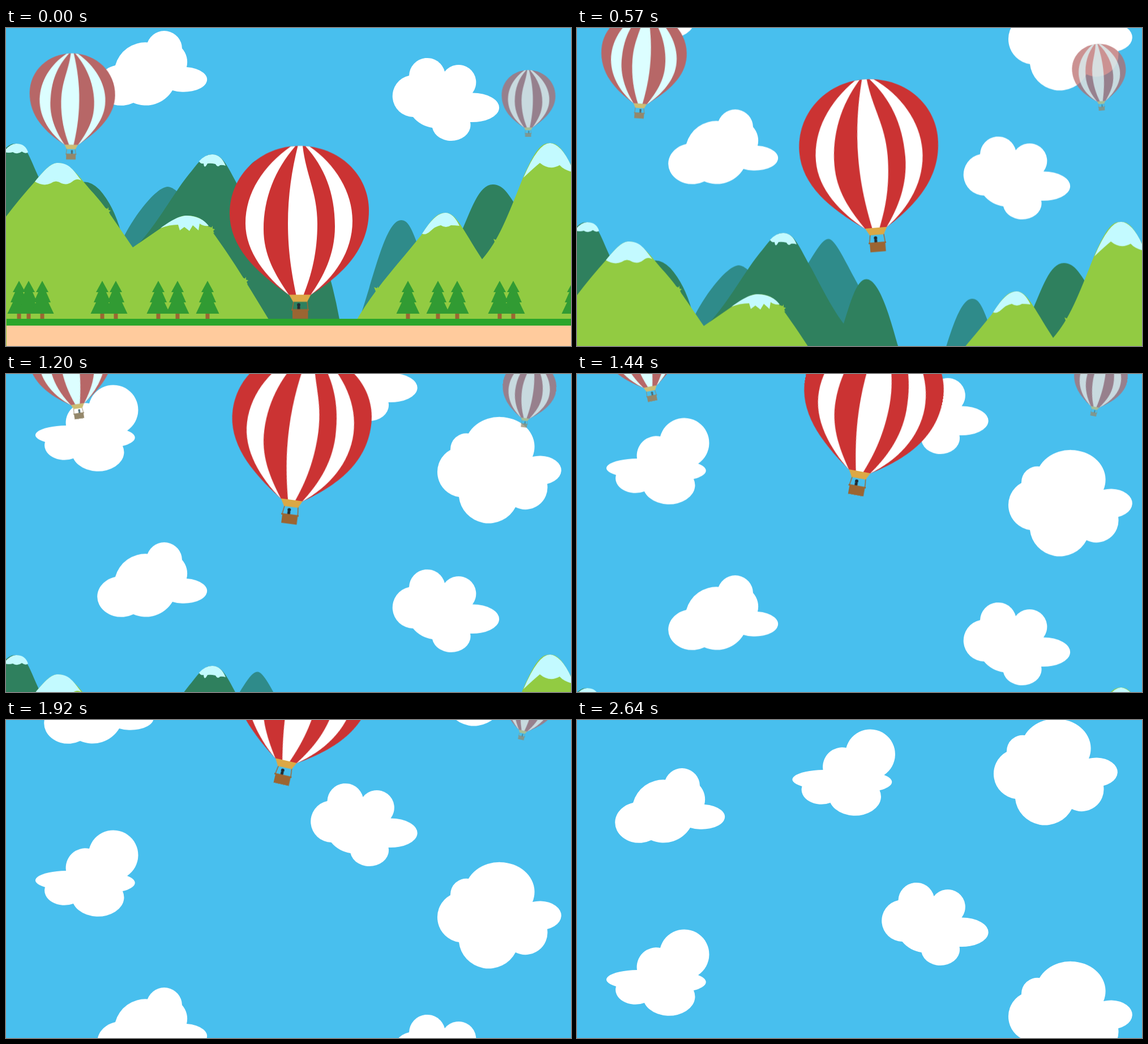
Recreate the animation shown at these times as an HTML page. Size 998 by 561 pixels, loop 2.73 s.

```html
<!DOCTYPE html>
<html lang="en">
<head>
<meta charset="utf-8">
<title>Balloons</title>
<style>
  html, body { margin: 0; width: 100%; height: 100%; overflow: hidden; background: #48bfee; }
  svg { display: block; width: 100%; height: 100%; }
  .bright { --red: #cb3333; --white: #fff; --gold: #dca845; --wood: #9b6532; --dark: #222b30; }
  .hazy { --red: #b76767; --white: #dcfeff; --gold: #cdbd73; --wood: #94876a; --dark: #4c6a70; }
  .faint { fill-opacity: .714; stroke-opacity: .714; }
  .red { fill: var(--red); }
  .white { fill: var(--white); }
  .gold { fill: var(--gold); }
  .wood { fill: var(--wood); }
  .dark { fill: var(--dark); }
  .rope { stroke: var(--wood); stroke-width: 1.5; }
</style>
</head>
<body>
<svg viewBox="0 0 998 561" preserveAspectRatio="none">
  <defs>
    <g id="tree">
      <path fill="#9b6633" d="M-3.500 57H3.500V67H-3.500Z"/>
      <path fill="#319b33" d="M0 0L11 20H7L15 38H11L20.500 58H-20.500L-11 38H-15L-7 20H-11Z"/>
    </g>
    <path id="tuft" d="M-5-6L0-4L2-7L2-2L6-1L3 2L5 6L-1 4Z"/>
    <g id="balloon">
      <path class="rope" d="M508 482L505.500 498M532 482L533.500 498"/>
      <path class="dark" d="M514.500 491H519.500V498H514.500Z"/>
      <circle class="dark" cx="517" cy="488.500" r="3"/>
      <path class="wood" d="M504 496H535V498.500H533.500V513H506V498.500H504Z"/>
      <path class="red" d="M500 471C440 430 395 385 395 327C395 260 450 208 518 208C590 208 641 260 641 322C641 390 595 435 538 471Z"/>
      <path class="white" d="M503 209C455 243 423 290 423 345C423 395 460 440 500 471C475 435 455 400 455 355C455 300 475 250 511 208.500Z"/>
      <path class="white" d="M515.500 208C505 250 498 295 498 345C498 395 505 435 512.500 471H525.500C540 435 550 395 550 345C550 290 530 260 524 208Z"/>
      <path class="white" d="M529 208.500C562 245 581 290 581 350C581 400 560 440 538 471C580 440 612 395 612 340C612 290 582 240 536 209Z"/>
      <path class="gold" d="M500 470.500H538.500L532 483H507Z"/>
    </g>
  </defs>

  <g id="world">
    <g fill="#2f8b8a">
      <path d="M200 385C222 335 265 280 286 280Q300 280 330 320V420Z"/>
      <path d="M380 320C415 270 430 233.500 444 233.500C456 233.500 472 270 500 321V390H380Z"/>
      <path d="M622 520C650 440 670 339 698 339C711 339 717 355 730 390L700 520Z"/>
    </g>
    <g fill="#2f805e">
      <path d="M-20 240C0 204 10 204 18 204C35 204 40 225 60 268L100 400H-20Z"/>
      <path d="M120 280Q140 261 165 285Q190 313 203 360L120 380Z"/>
      <path d="M215 400C260 360 290 300 320 262C340 238 348 223 364 223C385 223 392 248 415 287C440 335 455 362 471 383V520H300Z"/>
      <path d="M471 383C483 345 494 304.500 511 304.500C535 304.500 555 380 567 422Q580 465 589 514H440V383Z"/>
      <path d="M800 370C822 320 835 276 860 276C880 276 890 298 905 320L850 420Z"/>
    </g>
    <g fill="#92cb42">
      <path d="M-1 334Q24 301 52 270C70 248 80 238 92 238C115 238 130 265 155 292C180 320 205 360 224 387L275 352C295 339 305 331 319 331C340 331 350 338 362 356C385 388 400 410 420 442L464 514V561H-1Z"/>
      <path d="M620 514C655 455 690 420 733 366C750 340 760 326 776 326C795 326 805 352 841 408C870 375 885 335 914 262C935 215 945 203 961 203C980 203 990 228 1000 245V514Z"/>
      <use href="#tuft" x="179" y="323"/>
      <use href="#tuft" x="363" y="356"/>
      <use href="#tuft" x="422" y="446"/>
      <use href="#tuft" x="655" y="463"/>
      <use href="#tuft" x="866" y="378"/>
    </g>
    <g fill="#c3faff">
      <path d="M-2 216Q8 204 18 204Q34 204 39 219Q35 223 28 218Q20 224 12 219Q5 221-2 219Z"/>
      <path d="M51 271C70 248 80 238 92 238C112 238 120 252 133 269Q125 264 117 271Q108 278 98 274Q88 267 79 274Q66 280 51 271Z"/>
      <path d="M341 235Q352 223 364 223Q380 223 388 243Q382 241 378 242Q374 247 370 240Q362 238 356 239Q350 250 349 239Q343 240 341 235Z"/>
      <path d="M273 353C295 337 308 331 320 331Q345 332 358 349Q348 350 342 345L340 357L330 348L324 358L315 351L307 357L304 347Q288 347 273 353Z"/>
      <path d="M735 363Q758 326 776 326Q790 326 801 349Q793 348 786 348Q777 354 768 348Q758 350 750 358Q742 366 735 363Z"/>
      <path d="M914 264Q940 203 961 203Q982 205 1000 247V254Q985 250 978 242Q960 252 943 238Q932 247 914 264Z"/>
    </g>
    <g id="trees"></g>
    <path fill="#2ba62b" d="M1 513H998V525H1Z"/>
    <path fill="#ffcb9d" d="M1 525H998V570H1Z"/>
    <g fill="#fff">
      <path id="long" d="M193 66A55 55 0 0 1 250 25.500A31.500 31.500 0 0 1 311 36A36 36 0 0 1 319 69A41 22 0 1 1 294 110A55 55 0 0 1 225 132A42.500 36 0 1 1 193 66Z"/>
      <path id="puffy" d="M712 84A32 32 0 0 1 775 77A30 30 0 0 1 824 114.500A47 25.800 0 1 1 820 166A34 28 0 0 1 753 176A55 52 0 0 1 719 157A36.900 36.900 0 0 1 712 84Z"/>
      <path id="tall" d="M106-201A34.500 34.500 0 0 1 147-240A44 44 0 1 1 214-192A44 17 0 0 1 206-165A45 33 0 0 1 119-143A35 26 0 0 1 69-172A58 17 0 0 1 106-201Z"/>
      <path id="big" d="M785-158A28 28 0 0 1 817-187A61.500 52.500 0 0 1 930-146A37 25 0 0 1 956-98A39 39 0 0 1 900-57A53 52 0 0 1 800-75A44.500 44.500 0 0 1 785-158Z"/>
      <use href="#long" x="-94" y="-562"/>
      <use href="#puffy" x="-144.500" y="-408"/>
      <use href="#tall" x="328.500" y="-353"/>
      <use href="#big" x="-26" y="-428"/>
    </g>
  </g>
  <g id="balloons"></g>
</svg>
<script>
const STEP = 30, END = 2640, LOOP = 2730;
const $ = id => document.getElementById(id);
const timeline = [];

// Keeps an animation paused so that the clock below can set its time
function addMotion(el, frames, options, lead = 0) {
  const anim = el.animate(frames, { fill: 'both', ...options });
  anim.pause();
  timeline.push(t => anim.currentTime = t + lead);
}

const moveY = (el, distance) =>
  addMotion(el, { transform: ['translateY(0px)', `translateY(${distance}px)`] }, { duration: END });

// The right half of the wood mirrors the left
$('trees').innerHTML = [23, 40, 64, 170, 194, 269, 303, 356]
  .flatMap(x => [x, 1066 - x])
  .map(x => `<use href="#tree" x="${x}" y="446"/>`).join('');

// A negative flip mirrors the drawing; rise is the climb in pixels over one run
function addBalloon({ x, y, scale, skin, rise, flip = 1, tilt = 1, lead = 0 }) {
  $('balloons').insertAdjacentHTML('beforeend', `
    <g class="${skin}" transform="translate(${x} ${y}) scale(${flip * scale} ${scale})">
      <g><g><use href="#balloon" x="-518" y="-360.5"/></g></g>
    </g>`);
  const lift = $('balloons').lastElementChild.firstElementChild;
  moveY(lift, -rise / scale);
  addMotion(lift.firstElementChild, {
    transform: [0, -4.8, 13, 0].map(a => `rotate(${a * tilt}deg)`),
    offset: [0, 0.2, 0.8, 1],
    easing: 'ease'
  }, { duration: 2700 }, lead);
}

moveY($('world'), 642);
addBalloon({ x: 923, y: 133, scale: 0.386, skin: 'hazy faint', rise: 214, flip: -1, tilt: -1 });
addBalloon({ x: 116.9, y: 138.5, scale: 0.614, skin: 'hazy', rise: 335, flip: -1, lead: 75 });
addBalloon({ x: 518, y: 360.5, scale: 1, skin: 'bright', rise: 545 });

const start = performance.now();
function tick() {
  const ms = (performance.now() - start) % LOOP;
  const t = Math.min(Math.floor(ms / STEP) * STEP, END);
  timeline.forEach(seek => seek(t));
  requestAnimationFrame(tick);
}
tick();
</script>
</body>
</html>
```
